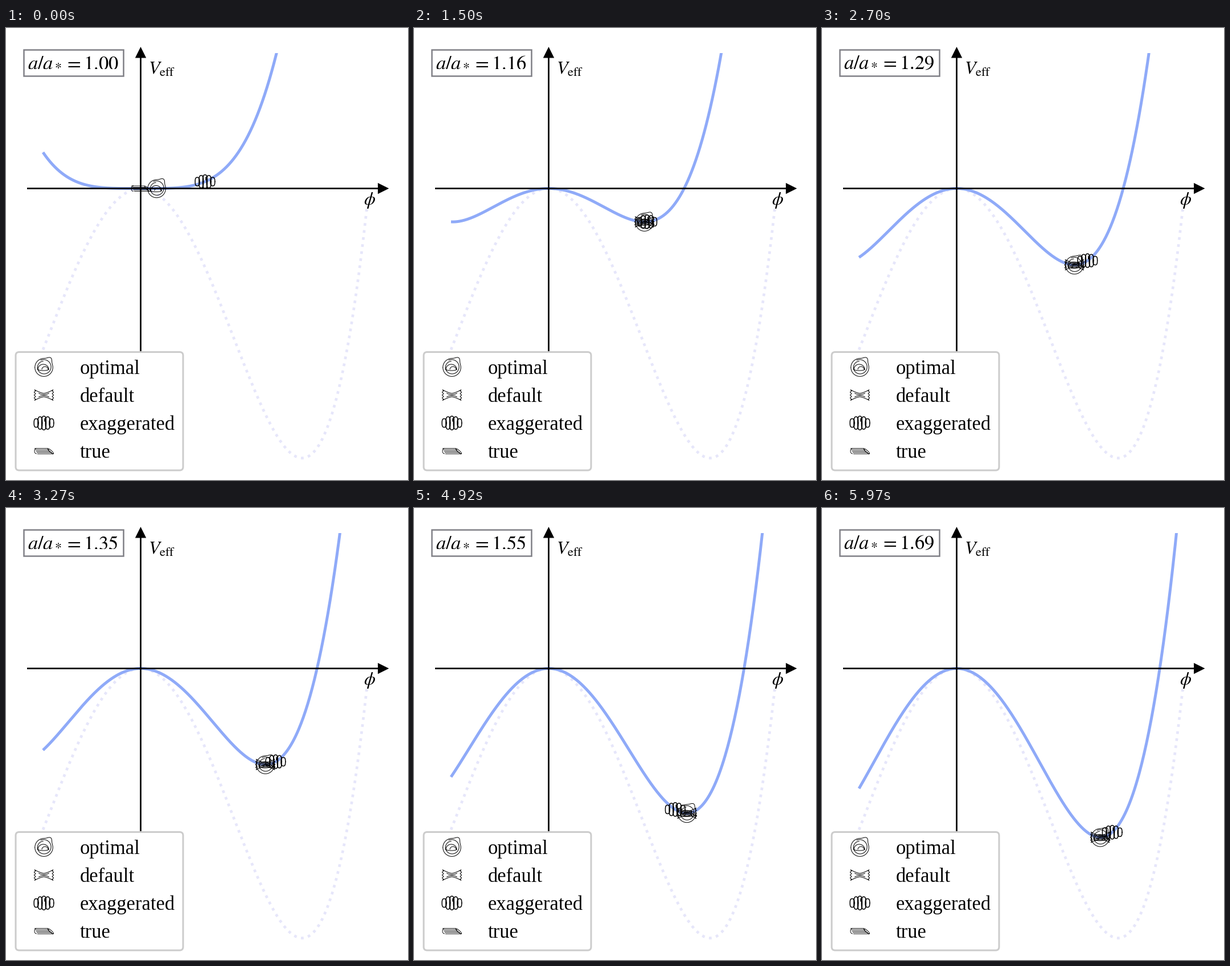
Animation, 706 px wide and 793 px high, one loop 6 s. Source, as a matplotlib script:

```python
import numpy as np
import matplotlib.pyplot as plt
from matplotlib.animation import FuncAnimation
from matplotlib.patches import FancyBboxPatch, PathPatch, Polygon, Rectangle
from matplotlib.path import Path

W, H, DPI = 706, 793, 64
PT = 72 / DPI                      # points per pixel
X0, Y0 = 236.5, 281.5              # origin of the plot
VEV, DEPTH = 283.5, 473            # late-time minimum: position and depth
LEFT, TOP = 65, 44
FRAMES = 200
TEXT = 34.5 * PT

plt.rcParams["font.family"] = "Liberation Serif"
plt.rcParams["mathtext.fontset"] = "stix"

fig = plt.figure(figsize=(W / DPI, H / DPI), dpi=DPI, facecolor="white")
ax = fig.add_axes([0, 0, 1, 1])
ax.set(xlim=(0, W), ylim=(H, 0))
ax.axis("off")


def scale_factor(n):
    return (1 + 0.0015 * n) ** 2


def well(a):
    return 1 - a ** -3


def height(u, k):
    """Screen y of the potential u^4 - 2 k u^2."""
    return Y0 - DEPTH * (u ** 4 - 2 * k * u ** 2)


def xy(x, y):
    return np.column_stack(np.broadcast_arrays(x, y))


def arc(cx, cy, rx, ry, start=0, stop=2 * np.pi, power=1.0):
    """Ellipse arc; a power below one squares it off."""
    t = np.linspace(start, stop, 49)
    c, s = np.cos(t), np.sin(t)
    return xy(cx + rx * np.sign(c) * abs(c) ** power,
              cy + ry * np.sign(s) * abs(s) ** power)


def glyph(*strokes):
    return Path.make_compound_path(*[Path(s) for s in strokes])


def shell():
    t = np.linspace(-np.pi, np.pi, 80)
    r = 15.8 + 5 * np.exp(-((t + 0.95) / 0.3) ** 2)
    rim = xy(r * np.cos(t), 0.5 + r * np.sin(t))
    t = np.linspace(-2, 4.6, 80)
    r = np.linspace(13.5, 10.5, 80)
    swirl = xy(r * np.cos(t), r * np.sin(t))
    ear = arc(-1, 4, 9.5, 9, np.pi, 2 * np.pi)
    lip = arc(-1, 4, 9.5, 2, 0, np.pi)
    fold = arc(2, 4, 5.5, 5, np.pi, 2 * np.pi)
    return glyph(rim, swirl, ear, lip, fold)


def bow():
    y = np.linspace(-9, 9, 40)
    x = np.linspace(-16, 16, 40)
    edge = 15.8 + 1.2 * np.cos(y * 2 * np.pi / 5)
    side = 3 + 6 * abs(x / 16) ** 1.4
    c = np.linspace(-9, 9, 20)
    crease = 0.8 + 2.4 * (c / 9) ** 2
    return glyph(xy(edge, y), xy(-edge, y), xy(x, side), xy(x, -side),
                 xy(c, crease), xy(c, -crease))


def ridged():
    lobes = [arc(x, 0, 3.9, 12 - 0.025 * x * x, power=0.7)
             for x in np.linspace(-13.4, 13.4, 5)]
    return glyph(*lobes, xy(1.5, np.array([-8, -3])))


def tube():
    ribs = [xy(np.array([-16 + 1.2 * i, 7 + 2.3 * i]), -4.5 + 2.4 * i)
            for i in range(5)]
    t = np.linspace(0, 2 * np.pi, 40)
    mouth = xy(12 + 5 * np.cos(t), 0.5 + 4.5 * np.cos(t - 0.5))
    return glyph(*ribs, mouth, arc(-13, 0.2, 3.5, 4.7, np.pi / 2, 3 * np.pi / 2))


def place(patch, shape, x, y):
    patch.set_path(Path(shape.vertices + (x, y), shape.codes))


def stamp(shape, x, y, lw, z):
    patch = PathPatch(shape, fill=False, ec="black", lw=lw * PT, zorder=z,
                      capstyle="round", joinstyle="round")
    ax.add_patch(patch)
    place(patch, shape, x, y)
    return patch


def arrow(tail, tip):
    """Axis line with a solid triangular head."""
    tail, tip = np.array(tail), np.array(tip)
    along = (tip - tail) / np.hypot(*(tip - tail))
    side = 9.7 * along[::-1]
    base = tip - 19.5 * along
    ax.plot(*zip(tail, base + 2 * along), color="black", lw=2.7 * PT, zorder=3,
            solid_capstyle="butt", snap=False)
    ax.add_patch(Polygon([tip, base - side, base + side], fc="black", lw=0,
                         zorder=3))


# faint late-time potential
xs = np.linspace(LEFT, 633.5, 600)
ax.plot(xs, height((xs - X0) / VEV, 1), ":", color="#e6e6fa", lw=4.7 * PT, zorder=1)

arrow((37, Y0), (672.5, Y0))
arrow((X0, 600), (X0, 33))
ax.text(250.5, 80.5, r"$V_{\mathrm{eff}}$", size=32 * PT)
ax.text(628.5, 309.7, r"$\phi$", size=32 * PT)

# legend
ax.add_patch(FancyBboxPatch((23.5, 575), 281, 194.5,
                            boxstyle="round,pad=6.5,rounding_size=6",
                            fc="white", ec="#cccccc", lw=3 * PT, zorder=5))
kinds = [("optimal", shell(), 1.0), ("default", bow(), 1.0),
         ("exaggerated", ridged(), 1.5), ("true", tube(), 0.9)]
for i, (name, shape, lw) in enumerate(kinds):
    stamp(shape, 66.5, 595 + 49 * i, lw, 6)
    ax.text(129.5, 607 + 49 * i, name, size=TEXT, zorder=6)

# readout
ax.add_patch(Rectangle((31, 38.3), 175, 45.5, fc="white", ec="#808086",
                       lw=2.5 * PT, zorder=4))
label = ax.text(38, 69, "", size=TEXT, zorder=5)

curve, = ax.plot([], [], color="#8faaf8", lw=5 * PT, zorder=2,
                 solid_capstyle="butt")
curve.set_clip_path(Rectangle((0, TOP), W, H, transform=ax.transData))
movers = [stamp(shape, 0, 0, lw, 4) for _, shape, lw in kinds]


def swing(n):
    """Damped oscillation about the minimum, faster as the well deepens."""
    size = 36 - 0.07 * n + 77 * np.exp(-n / 5)
    cycles = 29.95 * (n / (FRAMES - 1)) ** 1.5
    return size / VEV * np.cos(2 * np.pi * cycles)


def update(n):
    a = scale_factor(n)
    k = well(a)
    end = np.sqrt(k + np.sqrt(k * k + (Y0 - TOP + 20) / DEPTH))
    u = np.linspace((LEFT - X0) / VEV, end, 400)
    curve.set_data(X0 + VEV * u, height(u, k))
    label.set_text(rf"$a/a_* = {a:.2f}$")

    low = np.sqrt(k)
    spots = [max(low, 0.099), low, low + swing(n), low]
    for patch, (_, shape, _), s in zip(movers, kinds, spots):
        place(patch, shape, X0 + VEV * s, height(s, k))
    movers[1].set_visible(n > 0)
    return [curve, label, *movers]


anim = FuncAnimation(fig, update, frames=FRAMES, interval=30, repeat=True,
                     repeat_delay=0, blit=False)
plt.show()
```
